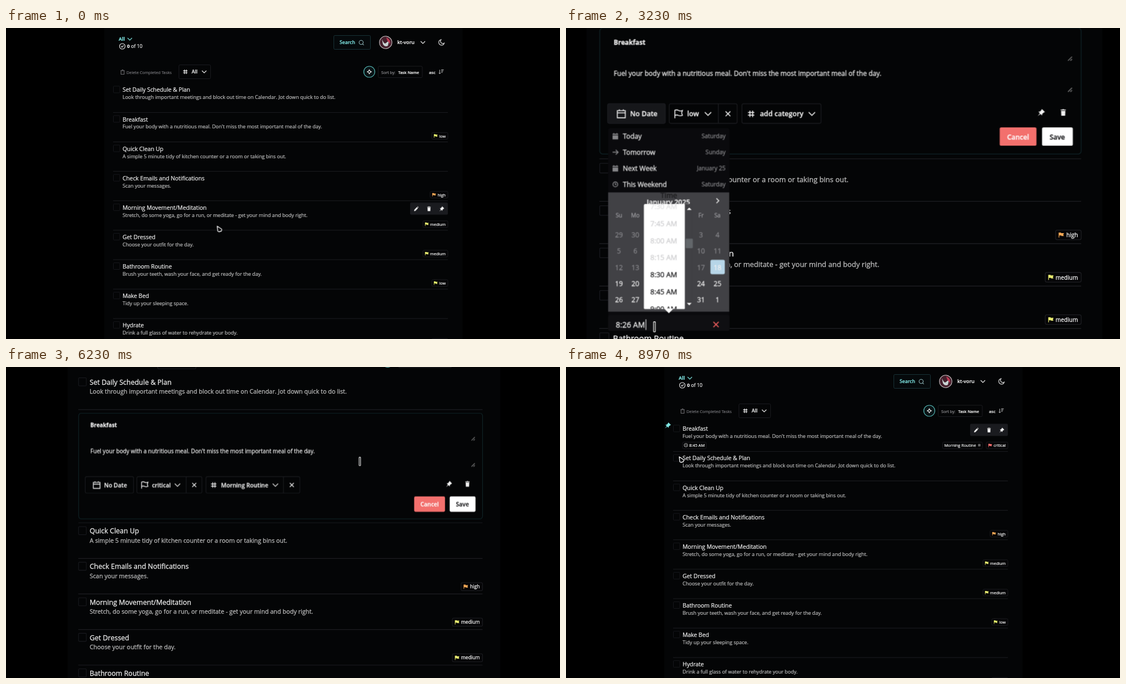
Write an HTML page that moves like this. It is 998x561 px and loops after 9000 ms.

```html
<!DOCTYPE html>
<html lang="en">
<head>
<meta charset="utf-8">
<title>Task list</title>
<style>
html, body { margin: 0; width: 100%; height: 100%; overflow: hidden; background: #000; }
svg { display: block; }
#stage { width: 100vw; height: 100vh; }
text { font-family: "Open Sans", "Noto Sans", sans-serif; dominant-baseline: central; white-space: pre; stroke-width: .22px; }
#camera { transform-origin: 495.5px 516px; animation: zoom 9s cubic-bezier(.45,0,.3,1) infinite; }
@keyframes zoom {
  0%, 21.67% { transform: scale(1); }
  36.5%, 62.5% { transform: scale(1.44); }
  78.6%, 100% { transform: scale(1); }
}
</style>
</head>
<body>
<svg id="stage" viewBox="0 0 998 561"><g id="camera"></g></svg>
<script>
const LOOP = 9000;
const WHITE = '#f2f2f2', GRAY = '#858588', LINE = '#1d1e22', TEAL = '#7fe5e2', PANEL = '#040506';
const FLAG = { low: '#e3ee6b', medium: '#e6e96f', high: '#f2a654', critical: '#f06b6b' };
const TAG_WIDTH = { low: 29, medium: 45, high: 32, critical: 39 };
const PITCH = 53.1;

// Moments of the story, in ms
const OPEN = 1000, DATE = 1660, TIME = 2630, PICK = 3560, DATE_END = 3870,
  PRIO = 4820, PRIO_END = 5080, CAT = 5340, CAT_END = 5560, PIN = 7400, SAVE = 7900;

let css = '', count = 0;
const percent = ms => (ms / LOOP * 100).toFixed(3) + '%';

function animated(frames, timing, html) {
  const name = 'a' + count++;
  css += `@keyframes ${name}{${frames}}`;
  return `<g style="animation:${name} ${LOOP}ms ${timing} infinite">${html}</g>`;
}

// Shows the markup only between pairs of times
function during(times, html) {
  const frames = times.map((t, i) => `${percent(t)}{opacity:${i % 2 ? 0 : 1}}`).join('');
  return animated('0%{opacity:0}' + frames, 'step-end', html);
}

function track(points, timing, html) {
  const frames = points.map(([t, x, y]) => `${percent(t)}{transform:translate(${x}px,${y}px)}`).join('');
  return animated(frames, timing, html);
}

const text = (x, y, s, size = 8.6, fill = WHITE, weight = 400, anchor = 'start') =>
  `<text x="${x}" y="${y}" font-size="${size}" fill="${fill}" stroke="${fill}" font-weight="${weight}" text-anchor="${anchor}">${s}</text>`;
const rect = (x, y, w, h, fill = 'none', stroke = 'none', r = 2) =>
  `<rect x="${x}" y="${y}" width="${w}" height="${h}" rx="${r}" fill="${fill}" stroke="${stroke}" stroke-width=".9"/>`;
const circle = (x, y, r, fill, stroke = 'none', w = 1) =>
  `<circle cx="${x}" cy="${y}" r="${r}" fill="${fill}" stroke="${stroke}" stroke-width="${w}"/>`;
const line = y => `<path d="M193 ${y}H796" stroke="${LINE}"/>`;

const STROKED = {
  chevron: 'M-4-2 0 2 4-2',
  right: 'M-1.5-3 1.5 0-1.5 3',
  cross: 'M-3-3 3 3M3-3-3 3',
  hash: 'M-1.5-4V4M1.8-4V4M-4-1.6H4M-4 1.7H4',
  search: 'M3.5 0A3.7 3.7 0 1 1-3.9 0 3.7 3.7 0 1 1 3.5 0M2.4 2.6 4.6 4.8',
  moon: 'M-.6-5A5 5 0 1 0 5 1.2 4.2 4.2 0 0 1-.6-5Z',
  check: 'M5 0A5 5 0 1 1-5 0 5 5 0 1 1 5 0M-2.2 0-.5 1.7 2.4-1.6',
  clock: 'M3 0A3 3 0 1 1-3 0 3 3 0 1 1 3 0M0-1.6V.2H1.4',
  bin: 'M-3.6-2.6H3.6M-2.8-2.4V4H2.8V-2.4M-1.2-4H1.2',
  calendar: 'M-5-4H5V5H-5ZM-5-1.2H5M-2.5-5.5V-4M2.5-5.5V-4',
  flag: 'M-4.5 5.5V-4.5Q-2-5.5 0-4.2T5-4.2L4 -1 5 2Q2 3 0 2T-4.5 2',
  star: 'M0-4.2Q.6-.6 4.2 0 .6.6 0 4.2-.6.6-4.2 0-.6-.6 0-4.2Z',
  sort: 'M-3-4V4M-5 2-3 4-1 2M0-4H5M0-1.5H4M0 1H3',
  arrow: 'M-3.5 0H3.5M.5-3 3.5 0 .5 3',
  grip: 'M-2.5 2.5 2.5-2.5M.5 2.5 2.5.5'
};
const FILLED = {
  pencil: 'M-4 4-3.4 1.4 1.2-3.2 3.2-1.2-1.4 3.4ZM1.9-3.9 2.8-4.4 4.4-2.8 3.9-1.9Z',
  trash: 'M-3.2-3.8H-1L-.6-4.4H.6L1-3.8H3.2V-2.8H-3.2ZM-2.7-2.2H2.7L2.4 4H-2.4Z',
  pin: 'M.8-4.6 4.6-.8 3.4-.2 1.4 1.4 1 3.6-.9 1.7-4.4 4.4-1.7.9-3.6-1-1.4-1.4.2-3.4Z',
  pennant: 'M-3.2-3H-.4L0-2.3H3.4L2.6 0 3.4 1.4H.4L0 .8H-2.4V3.4H-3.2Z',
  day: 'M-3.5-3H-2.4V-4H-1.4V-3H1.4V-4H2.4V-3H3.5V-1.6H-3.5ZM-3.5-.9H3.5V4H-3.5Z'
};
function icon(name, x, y, color = WHITE, scale = 1) {
  const paint = FILLED[name] ? `fill="${color}"` : `fill="none" stroke="${color}" stroke-width="1.1"`;
  return `<path transform="translate(${x} ${y}) scale(${scale})" d="${FILLED[name] || STROKED[name]}" ${paint}/>`;
}

function tag(y, level) {
  const w = TAG_WIDTH[level], x = 796 - w;
  return rect(x, y - 6, w, 12, '#050507', LINE, 2) + icon('pennant', x + 7, y, FLAG[level]) +
    text(792, y, level, 7.2, WHITE, 400, 'end');
}

function row(index, title, note, level) {
  const y = 111.4 + index * PITCH;
  return rect(193.5, y - 6.5, 11.5, 12, 'none', '#191a1f', 1) +
    text(210, y, title, 10.35) + text(210, y + 13.4, note, 9.03, '#bcbcbc') +
    (level ? tag(y + 30, level) : '') + line(y + 41);
}

const header =
  text(203, 19.5, 'All', 8.6, TEAL, 700) + icon('chevron', 223, 20, TEAL) +
  icon('check', 209.5, 33, WHITE) + text(218, 33, '<tspan font-weight="700">0</tspan> of 10', 8.7) +
  rect(590.5, 13.5, 66, 25, '#05090b', '#1b373d') + text(601, 26, 'Search', 8.6, TEAL, 600) + icon('search', 640, 26, '#8fb5b8') +
  circle(684, 26, 11.2, '#45202c', '#cfc6c8', 1.1) +
  '<path d="M677 20Q680 27 683 28L690 23 688 32Q682 35 679 29Z" fill="#c9d3d2"/><path d="M685 17Q693 20 692 29L687 23Z" fill="#c03a55"/>' +
  text(705, 26, 'kt-voru', 8.8, WHITE, 600) + icon('chevron', 751, 26) + icon('moon', 784.5, 26) +
  icon('bin', 210, 79.5, '#6c6c70') + text(217, 79.5, 'Delete Completed Tasks', 7.3, '#717175') +
  rect(311.5, 66.5, 57, 25, 'none', LINE) + icon('hash', 323, 79) + text(334.5, 79, 'All', 8.6, WHITE, 600) + icon('chevron', 357, 79) +
  circle(654.5, 79, 10, '#0a1416', '#55b9b6', 1.2) + icon('star', 654.5, 79) +
  rect(670.5, 69, 79.5, 20.5, 'none', LINE) + text(676, 79.5, 'Sort by:', 7.2, '#8d8d90') +
  text(744, 79.5, 'Task Name', 7.1, WHITE, 600, 'end') + text(762, 79.5, 'asc', 7.5, WHITE, 600) + icon('sort', 784, 79, '#c8c8c8', .9);

const meal = "Fuel your body with a nutritious meal. Don't miss the most important meal of the day.";
const plan = row(0, 'Set Daily Schedule &amp; Plan', 'Look through important meetings and block out time on Calendar. Jot down quick to do list.');
const rest = [
  ['Quick Clean Up', 'A simple 5 minute tidy of kitchen counter or a room or taking bins out.'],
  ['Check Emails and Notifications', 'Scan your messages.', 'high'],
  ['Morning Movement/Meditation', 'Stretch, do some yoga, go for a run, or meditate - get your mind and body right.', 'medium'],
  ['Get Dressed', 'Choose your outfit for the day.', 'medium'],
  ['Bathroom Routine', 'Brush your teeth, wash your face, and get ready for the day.', 'low'],
  ['Make Bed', 'Tidy up your sleeping space.'],
  ['Hydrate', 'Drink a full glass of water to rehydrate your body.', 'low']
].map((r, i) => row(i + 2, ...r)).join('');

const list =
  track([[0, 0, 0], [SAVE, 0, PITCH], [LOOP, 0, PITCH]], 'step-end', plan) +
  track([[0, 0, 0], [OPEN, 0, 116.1], [SAVE, 0, 0], [LOOP, 0, 0]], 'step-end', rest) +
  during([0, OPEN], row(1, 'Breakfast', meal, 'low')) +
  during([SAVE, LOOP], row(0, 'Breakfast', meal, 'critical') +
    icon('pin', 183.5, 105.5, TEAL, 1.2) +
    rect(210, 135.5, 42.5, 12, 'none', LINE) + icon('clock', 216, 141, '#a0a0a0') + text(222, 141, '8:45 AM', 7.4) +
    rect(678.5, 135.5, 71.5, 12, 'none', LINE) + text(681.5, 141, 'Morning Routine', 7.3) + icon('hash', 744.5, 141, '#b0b0b0', .6));

const rowTools = track(
  [[0, 0, 3 * PITCH], [265, 0, 2 * PITCH], [390, 0, PITCH], [510, 0, 0], [OPEN, 0, -400],
   [SAVE, 0, 2 * PITCH], [8060, 0, PITCH], [8140, 0, 0], [8220, 0, -PITCH], [LOOP, 0, -PITCH]], 'step-end',
  rect(728, 155.5, 68, 22, '#1a1b1f') + icon('pencil', 739, 167) + icon('trash', 762, 167) + icon('pin', 785, 167));

const box = (x, w) => rect(x + .5, 252.5, w - 1, 24.5, 'none', LINE);
const fill = (x, w, ...times) => during(times, rect(x, 252, w, 25, '#16171a'));
const split = x => `<path d="M${x} 252.5V277" stroke="${LINE}"/>`;
const label = (x, s) => text(x, 265, s, 8.7, WHITE, 600);
const priority = (w, s) => box(280, w) + split(280 + w - 24) + icon('flag', 292, 265) + label(303, s) +
  icon('chevron', 280 + w - 37, 265) + icon('cross', 280 + w - 12, 265);
const category = (x, s) => icon('hash', x + 12, 265) + label(x + 23, s);

const form =
  rect(193.5, 157.5, 602.5, 158, PANEL, '#13282c', 4) + line(321.5) +
  text(211, 175, 'Breakfast', 8.2, WHITE, 700) + icon('grip', 782, 196, '#777') +
  text(211, 214.3, meal, 8.41) + icon('grip', 782, 235, '#777') +
  fill(203, 73, 1480, DATE_END + 100) + box(203, 73) + icon('calendar', 220.5, 265) + label(231.5, 'No Date') +
  fill(280, 62, 4720, PRIO_END) +
  during([OPEN, PRIO_END], priority(86, 'low')) +
  during([PRIO_END, SAVE], priority(98, 'critical')) +
  fill(371, 100, 4200, 4720) + fill(383, 100, 5240, CAT_END) +
  during([OPEN, PRIO_END], box(371, 100) + category(371, 'add category') + icon('chevron', 459, 265)) +
  during([PRIO_END, CAT_END], box(383, 100) + category(383, 'add category') + icon('chevron', 471, 265)) +
  during([CAT_END, SAVE], box(383, 141) + split(499) + category(383, 'Morning Routine') + icon('chevron', 487, 265) + icon('cross', 511.5, 265)) +
  icon('pin', 746, 263.5) + during([PIN, SAVE], icon('pin', 746, 263.5, TEAL)) + icon('trash', 773.5, 263.5) +
  rect(694, 282, 46, 23, '#f3706d') + text(717, 294, 'Cancel', 8.6, '#fff', 600, 'middle') +
  rect(747, 282, 38.5, 23, '#fff') + text(766, 294, 'Save', 8.6, '#1c1c1e', 600, 'middle');

const shortcuts = [['Today', 'Saturday', 'day'], ['Tomorrow', 'Sunday', 'arrow'], ['Next Week', 'January 25', 'day'], ['This Weekend', 'Saturday', 'clock']]
  .map(([s, when, name], i) => {
    const y = 293 + i * 20.15;
    return icon(name, 213, y, GRAY) + text(222.5, y, s, 8.5) + text(351, y, when, 7.3, GRAY, 400, 'end');
  }).join('');

const column = i => 217.5 + i * 20.55;
const weekdays = ['Su', 'Mo', 'Tu', 'We', 'Th', 'Fr', 'Sa']
  .map((d, i) => text(column(i), 392, d, 7.1, '#9a9a9e', 400, 'middle')).join('');
const days = Array.from({ length: 35 }, (_, i) => {
  const day = i < 3 ? i + 29 : (i - 3) % 31 + 1;
  return text(column(i % 7), 416.7 + Math.floor(i / 7) * 20.4, day, 8.5, i > 19 ? WHITE : '#87878b', 400, 'middle');
}).join('');

const times = ['7:30', '7:45', '8:00', '8:15', '8:30', '8:45', '9:00']
  .map((s, i) => text(25, 2.6 + i * 21.5, s + ' AM', 8.9, i > 3 ? '#1d1d1f' : i ? '#cfcfd1' : '#e2e2e4', 400, 'middle')).join('');
const timeList =
  rect(248.6, 378, 59.6, 133, '#414145', 'none', 0) + text(280, 367, 'Time', 9, '#1c1c1e', 400, 'middle') +
  `<svg x="248.6" y="378" width="51.4" height="131.7">${rect(0, 0, 52, 132, '#fff', 'none', 2)}${times}</svg>` +
  rect(301, 421.5, 9, 12, '#62666a', 'none', 1) +
  '<path d="M302.5 385.5h6l-3-3ZM302.5 502h6l-3 3ZM274 509h12l-6 6Z" fill="#fff"/>';
const timeField = s => text(213.5, 529.5, s, 9.7);

const dateMenu =
  rect(204, 283, 152, 254, '#0a0a0d') + shortcuts +
  rect(204, 363.5, 151.5, 149.5, '#414145', 'none', 0) +
  text(279.5, 375.5, 'January 2025', 8.7, WHITE, 600, 'middle') + icon('right', 341, 374) + weekdays +
  rect(332, 448, 18, 18, '#b7d6e8') + days +
  during([DATE, TIME], circle(213.5, 527, 4.2, '#a0a0a3') + '<path d="M213.5 524.5V527.3H215.5" fill="none" stroke="#111"/>' +
    text(223, 527, 'Set Time', 8.5) + text(351, 527, 'No Time', 7.3, GRAY, 400, 'end')) +
  during([TIME, DATE_END], rect(204, 517, 152, 20, '#0f0f12') + icon('cross', 339, 529, '#ee5f5f', 1.1)) +
  during([TIME, PICK], timeField('8:26 AM') + '<path d="M251.3 522.5V536" stroke="#fff" stroke-width=".8"/>' + timeList) +
  during([PICK, DATE_END], timeField('8:45 AM'));

const levels = Object.keys(FLAG).reverse();
const priorityMenu = rect(280, 282, 90, 82, '#0a0a0d', LINE) +
  levels.map((s, i) => icon('pennant', 292, 293 + i * 20, FLAG[s]) + text(303, 293 + i * 20, s, 8.5)).join('');
const categoryMenu = rect(383, 282, 116, 23, '#0a0a0d', LINE) + icon('hash', 395, 293.5, WHITE, .8) + text(406, 293.5, 'Morning Routine', 8.5);

const shape = d => `<path d="${d}" fill="#08080a" stroke="#fff" stroke-width="1.3" stroke-linejoin="round"/>`;
const pointer =
  during([0, 560, OPEN, 1480, 1760, 2400, 3330, 4200, 5620, 5850, 6930, 7250, SAVE, LOOP], shape('M-4-5 4 .2Q4.8 2 3.2 4L-1 5-3 4Z')) +
  during([560, OPEN, 1480, 1760, 2400, TIME, 4200, 5620, 7250, SAVE],
    shape('M-2.2 2V-5.4A1.3 1.3 0 0 1 .4-5.4V-1.8L4-1Q5.5-.5 5.2 1.5L4.3 6.2H-1.6L-5 2.2Q-5 .6-3.5 .9Z')) +
  during([TIME, 3330, 5850, 6930], rect(-1.1, -6.3, 2.2, 12.6, '#111', '#e8e8e8', .4));

const pointerPath = [
  [0, 384.5, 362.5], [60, 384.5, 362.5], [700, 739, 168], [1040, 739, 168], [1500, 240, 268], [1690, 240, 268],
  [1970, 250, 305], [2450, 250, 529], [2650, 250, 529], [3000, 262, 532], [3280, 262, 532], [3500, 275, 490],
  [3600, 275, 490], [3850, 440, 310], [4300, 400, 270], [4480, 400, 270], [4630, 342.5, 280], [4770, 312, 270],
  [4850, 312, 270], [5030, 310, 296], [5110, 310, 296], [5280, 425, 270], [5360, 425, 270], [5520, 425, 296],
  [5600, 425, 296], [6230, 613, 229.8], [6830, 578, 216], [6900, 578, 216], [7300, 747, 266], [7450, 747, 266],
  [7700, 767, 297], [7920, 767, 297], [8350, 240, 140], [8500, 240, 140], [8940, 208, 167], [LOOP, 208, 167]
];

document.getElementById('camera').innerHTML =
  rect(177, -600, 645.5, 1800, PANEL, 'none', 0) + header + list + rowTools +
  during([OPEN, SAVE], form) + during([DATE, DATE_END], dateMenu) +
  during([PRIO, PRIO_END], priorityMenu) + during([CAT, CAT_END], categoryMenu) +
  track(pointerPath, 'ease-in-out', pointer);
document.head.appendChild(document.createElement('style')).textContent = css;
</script>
</body>
</html>
```
